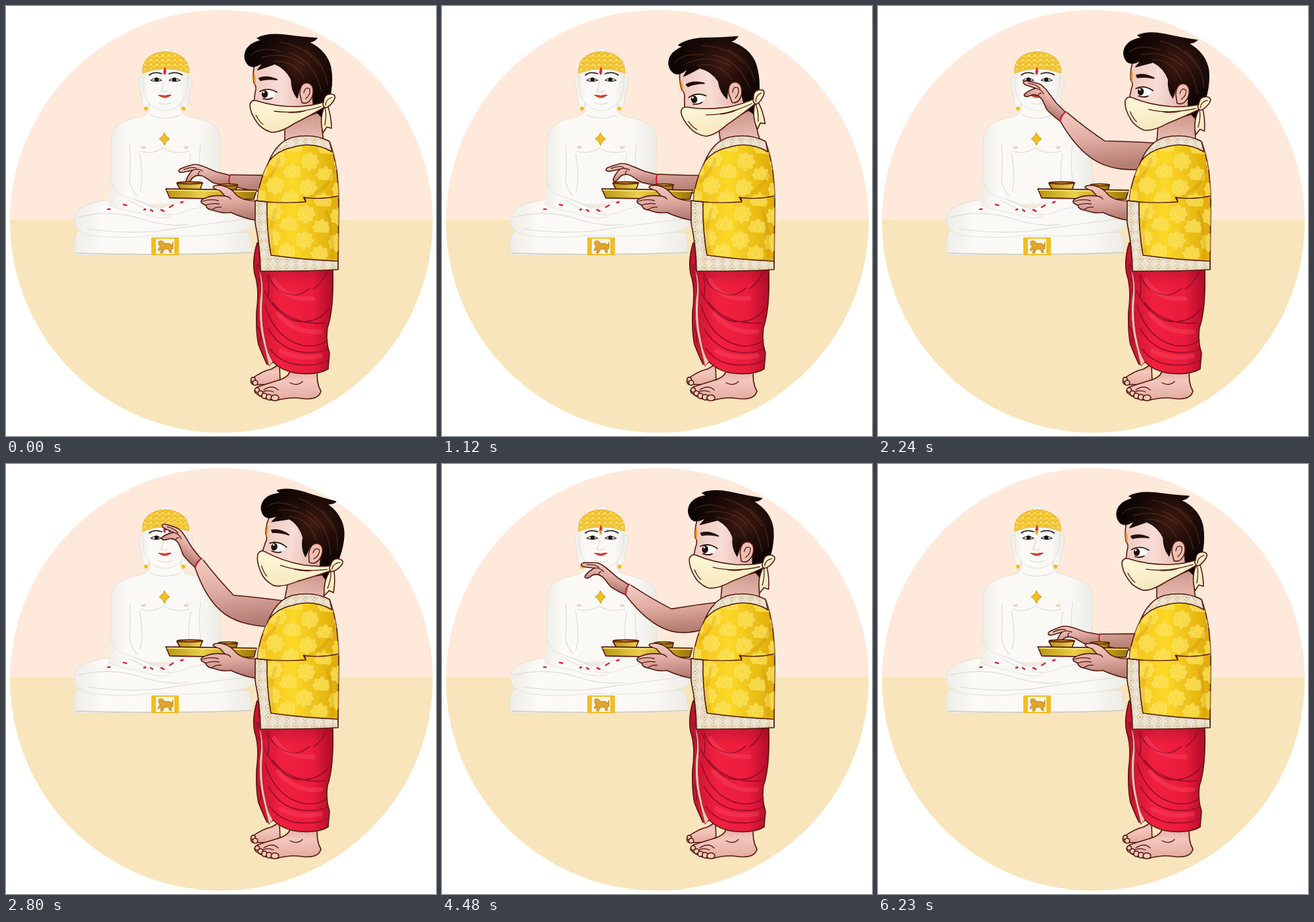
Recreate the animation shown at these times as an HTML page. Size 654 px wide and 654 px high, loop 6300 ms.

```html
<!DOCTYPE html>
<html lang="en">
<head>
<meta charset="utf-8">
<title>Offering</title>
<style>
html, body { margin: 0; height: 100%; overflow: hidden; background: #fff; }
svg { display: block; width: 100vw; height: 100vh; }
path, ellipse, circle { stroke-linejoin: round; stroke-linecap: round; }
.ink { stroke: #54180f; stroke-width: 1.6; }
.line { fill: none; stroke: #54180f; stroke-width: 1.3; }
.stone { fill: url(#stone); stroke: #e4e1d9; stroke-width: 1; }
.fold { fill: none; stroke: #dedbd3; stroke-width: 1.2; }
.crease { fill: none; stroke: #8f0c27; stroke-width: 1.5; }
.nail { fill: none; stroke: #d72b43; stroke-width: 2.6; }
</style>
</head>
<body>
<svg viewBox="0 0 654 654">
<defs>
  <clipPath id="disc"><circle cx="327.5" cy="327.5" r="321.5"/></clipPath>
  <linearGradient id="stone"><stop stop-color="#efede8"/><stop offset=".16" stop-color="#fbfaf7"/><stop offset=".8" stop-color="#f9f8f5"/><stop offset="1" stop-color="#ecebe5"/></linearGradient>
  <linearGradient id="skin" x2=".15" y2="1"><stop stop-color="#f3cdc3"/><stop offset=".5" stop-color="#e0aca2"/><stop offset="1" stop-color="#b47d74"/></linearGradient>
  <linearGradient id="foot" x2=".1" y2="1"><stop stop-color="#e0a298"/><stop offset=".45" stop-color="#f3c6bc"/><stop offset="1" stop-color="#e5aca1"/></linearGradient>
  <linearGradient id="face"><stop stop-color="#efc9c0"/><stop offset=".4" stop-color="#f8dcd5"/><stop offset="1" stop-color="#d9a195"/></linearGradient>
  <linearGradient id="neck" y2="1" x2="0"><stop stop-color="#c48a7f"/><stop offset="1" stop-color="#eec4b9"/></linearGradient>
  <radialGradient id="hair" cx=".62" cy=".35" r=".55"><stop stop-color="#3f1b12"/><stop offset=".5" stop-color="#200c08"/><stop offset="1" stop-color="#0b0403"/></radialGradient>
  <linearGradient id="cloth"><stop stop-color="#f2c21c"/><stop offset=".45" stop-color="#fbd827"/><stop offset="1" stop-color="#dfaa08"/></linearGradient>
  <linearGradient id="red"><stop stop-color="#c5102f"/><stop offset=".35" stop-color="#f1203f"/><stop offset=".75" stop-color="#ea1b3c"/><stop offset="1" stop-color="#b00d2a"/></linearGradient>
  <linearGradient id="shade" x2="0" y2="1"><stop stop-color="#8f0c27" stop-opacity=".5"/><stop offset=".5" stop-color="#8f0c27" stop-opacity="0"/></linearGradient>
  <linearGradient id="gold"><stop stop-color="#b8920f"/><stop offset=".4" stop-color="#ead04a"/><stop offset=".7" stop-color="#cda51b"/><stop offset="1" stop-color="#997508"/></linearGradient>
  <linearGradient id="mask" x2=".3" y2="1"><stop stop-color="#fff8dc"/><stop offset="1" stop-color="#f6e8bd"/></linearGradient>
  <pattern id="motif" width="50" height="40" patternUnits="userSpaceOnUse" patternTransform="translate(450 222) rotate(4)">
    <g id="flower" fill="#fbe04e" stroke="#fbea95" stroke-width="1.1">
      <path d="M13-1l4 5 6 0 0 6 4 3-4 4 0 6-6 0-4 5-4-5-6 0 0-6-4-4 4-3 0-6 6 0z"/>
      <path d="M13 5l6 8-6 8-6-8z"/>
    </g>
    <use href="#flower" x="25" y="20"/>
  </pattern>
  <pattern id="lace" width="14" height="14" patternUnits="userSpaceOnUse">
    <path fill="#ece3d2" d="M0 0h14v14H0z"/>
    <path d="M7 1l5 6-5 6-5-6z" fill="none" stroke="#d0b98a" stroke-width="1"/><circle cx="7" cy="7" r="1.6" fill="#d9b35f"/>
  </pattern>
  <pattern id="beads" width="9" height="7" patternUnits="userSpaceOnUse">
    <path fill="#f6cc3c" d="M0 0h9v7H0z"/><path d="M0 5q4.500-7 9 0" fill="none" stroke="#e3a925" stroke-width="1"/><circle cx="4.500" cy="5" r="1.200" fill="#ffe78c"/>
  </pattern>
</defs>

<g clip-path="url(#disc)"><path fill="#ffe9db" d="M0 0h654v325H0z"/><path fill="#f8e5bb" d="M0 325h654v329H0z"/></g>

<g id="statue">
  <path class="stone" d="M109 343Q103 347 104 374Q105 379 114 379L368 377Q375 376 374 367L371 345Z"/>
  <path d="M107 376Q240 380 373 375" fill="none" stroke="#cfcabe" stroke-width="1.6"/>
  <path class="stone" d="M219 148Q220 164 207 168Q169 175 162 192C157 222 162 244 158 267Q160 284 174 292L185 302H304L320 287Q329 274 326 254C323 230 330 204 323 189Q315 175 278 168Q263 164 265 147Z"/>
  <path class="fold" d="M188 212Q190 240 188 263Q188 276 199 289M296 211Q292 239 296 263Q298 278 288 288M203 224Q210 259 204 282M281 225Q275 254 280 280M205 221Q224 226 239 216Q255 226 279 221M220 166Q241 175 265 166"/>
  <path class="stone" d="M175 292C145 297 113 300 105 317Q98 342 130 349Q175 355 222 349Q315 353 365 341Q384 333 379 319Q370 303 329 299L300 290Q267 307 239 306Q207 306 175 292Z"/>
  <path class="stone" d="M161 269Q163 285 184 290Q212 300 238 310Q252 316 250 321Q232 326 202 314Q166 309 156 302M325 270Q322 286 302 291Q268 294 248 303Q230 309 232 315Q250 323 281 309Q303 306 319 298"/>
  <path class="fold" d="M109 321Q161 309 206 324Q245 337 278 332M124 339Q201 350 266 337Q327 329 372 323M187 296l30 15M196 294l32 14"/>
  <path class="nail" d="M155 309l3 0M179 302l4 1M210 310l2-1M236 310l4 2M249 306l5-3M266 299l3-1M220 310l3 2"/>
  <path class="stone" d="M209 108Q199 104 202 120Q206 130 207 149Q211 160 217 154L215 125ZM275 108Q286 104 283 121Q278 131 277 149Q272 160 267 154L270 125Z"/>
  <path class="stone" d="M208 99Q206 136 217 147Q229 159 242 159Q257 159 268 146Q279 133 277 98Q242 77 208 99Z"/>
  <ellipse class="stone" cx="243" cy="70" rx="8" ry="5.5"/>
  <path d="M208 102Q205 73 242 69Q280 73 278 102Q243 89 208 102Z" fill="url(#beads)" stroke="#e5b53a"/>
  <path d="M208 101Q243 88 278 101" fill="none" stroke="#f0c445" stroke-width="2.4"/>
  <path d="M218 105Q226 99 237 103M248 103Q259 99 268 105" fill="none" stroke="#292322" stroke-width="1.7"/>
  <path d="M220 113Q228 107 237 113Q228 116 220 113ZM248 113Q256 107 265 113Q257 116 248 113Z" fill="#fff" stroke="#302723" stroke-width="1.1"/>
  <circle cx="229" cy="112" r="3.2" fill="#15100f"/><circle cx="256" cy="112" r="3.2" fill="#15100f"/>
  <path d="M239 114Q240 125 235 129Q241 133 247 128M232 147Q242 152 252 147" fill="none" stroke="#e3d6cd" stroke-width="1.1"/>
  <path d="M231 135Q237 135 242 136Q247 134 252 135Q242 145 231 135Z" fill="#e5503f"/><path d="M232 136Q242 139 251 136" fill="none" stroke="#a22d22" stroke-width=".8"/>
  <path d="M242 92Q246 101 241 105Q237 101 242 92Z" fill="#dc283b"/>
  <ellipse id="paste" cx="241.5" cy="104" rx="1.8" ry="3.6" fill="#f3a11d"/>
  <g fill="#f4bd1b"><circle cx="213" cy="156" r="3"/><circle cx="270" cy="156" r="3"/></g>
  <path d="M241 193l3 5 5 4-5 4-3 6-3-6-5-4 5-4z" fill="#f0be20" stroke="#d69f1c"/>
  <g fill="#ecd4cb"><ellipse cx="209" cy="215" rx="4" ry="2"/><ellipse cx="274" cy="215" rx="4" ry="2"/></g>
  <path fill="#f2bd25" d="M221 352h42v27h-42z"/><path fill="#fdf6e0" d="M228 354h28v23h-28z"/>
  <path d="M232 362q-1-5 3-5 4 0 6 4h7q4 1 4 4l2-6v10l-3 1 1 5h-3l-2-5h-6l-3 6h-3l1-7-3 3h-2l3-6z" fill="#e0a52c" stroke="#8f6820" stroke-width=".6"/>
</g>

<path id="arm" class="ink" fill="url(#skin)"/>
<g id="hand">
  <path class="ink" fill="url(#skin)" d="M0-7L-20-12C-38-19-50-26-59-23Q-67-21-77-17C-81-13-78-11-72-12L-58-15Q-65-8-68 1C-68 5-64 4-61 1Q-56-8-47-7C-37-6-33 2-24 5Q-12 8 0 9"/>
  <path class="line" d="M-58-15Q-50-18-43-14M-71-16Q-59-21-52-18M-48-7Q-51-10-47-13"/>
  <path d="M0-8Q-5 1 0 9" fill="none" stroke="#d51e39" stroke-width="2.2"/>
</g>

<g class="turn"><path class="ink" fill="url(#neck)" d="M424 176V212H484Q480 191 480 150Z"/></g>

<g id="feet">
  <path class="ink" fill="url(#foot)" d="M416 545L404 552Q388 556 374 567Q370 573 376 576L417 575Z"/>
  <path class="ink" fill="url(#foot)" d="M432 552Q433 564 412 570L383 579Q375 584 380 589Q393 600 411 600Q433 594 450 597Q475 600 479 586Q471 572 474 552Z"/>
  <path class="line" d="M386 590Q396 582 407 587M392 584Q405 575 414 584M432 573Q443 579 451 571"/>
  <g class="ink" fill="#f2c9ba" stroke-width="1"><circle cx="376" cy="568" r="3.4"/><circle cx="379" cy="573" r="3.8"/><circle cx="382" cy="584" r="3.5"/><circle cx="387" cy="589" r="3.8"/><circle cx="393" cy="593" r="4"/><circle cx="400" cy="595" r="4.2"/><ellipse cx="409" cy="596" rx="6" ry="4.5"/></g>
</g>

<g id="dhoti">
  <path id="drape" class="ink" fill="url(#red)" d="M382 360Q374 386 378 407Q386 430 381 465Q380 496 384 515Q392 535 397 545L407 542Q422 557 447 559Q476 561 490 552L492 528Q486 511 489 489Q499 460 497 400Z"/>
  <path fill="url(#shade)" d="M380 392H497V460H382Z"/>
  <path class="crease" d="M398 407Q407 437 441 440Q452 438 462 429M393 433Q413 474 444 480Q477 482 491 460M394 455Q409 506 451 516Q475 520 489 508M399 491Q420 527 459 527Q480 528 490 520M405 450Q431 486 485 482M401 521Q420 546 453 546Q478 547 491 538M397 412Q402 424 398 444M383 414Q389 419 387 433M383 488Q389 494 387 511M488 404Q481 421 468 430"/>
  <path d="M408 417Q424 448 467 445M414 468Q442 500 479 495M418 525Q447 539 479 532" fill="none" stroke="#ff5870" stroke-width="7" opacity=".3"/>
  <path d="M386 402Q393 420 390 450Q388 482 395 511Q398 529 406 541L400 548Q393 520 389 502Q384 479 386 447Q390 427 385 402Z" fill="#f1c4b4" stroke="#a72831"/>
</g>

<g id="shawl">
  <path class="ink" fill="url(#cloth)" d="M430 204Q463 194 492 206Q499 224 503 250Q507 281 506 310L505 400L388 402Q383 371 382 298Q384 267 400 236Q412 211 430 204Z"/>
  <path fill="url(#motif)" d="M430 204Q463 194 492 206Q499 224 503 250Q507 281 506 310L505 400L388 402Q383 371 382 298Q384 267 400 236Q412 211 430 204Z" opacity=".75"/>
  <path class="ink" fill="url(#lace)" d="M400 236Q412 207 435 200Q468 193 492 206L496 222Q468 205 436 215Q414 219 400 236Z"/>
  <path d="M499 245Q494 277 457 292M393 267Q412 250 415 233M488 313Q498 343 496 381M410 310Q398 344 407 374" fill="none" stroke="#b77d06" stroke-width="5" opacity=".2"/>
</g>

<g id="offering">
  <path class="ink" fill="url(#gold)" d="M260 270L265 279H295L299 269ZM323 272L327 280H350L352 272Z"/>
  <ellipse class="ink" cx="279.5" cy="269" rx="19.5" ry="1.6" fill="#f0a63c"/><ellipse class="ink" cx="337.5" cy="272" rx="14.5" ry="1.5" fill="#e8c24b"/>
  <path class="ink" fill="url(#gold)" d="M243 278L381 280L377 294L249 292Z"/><path d="M245 280L380 282" stroke="#fae987" stroke-width="1.5"/>
  <path class="ink" fill="url(#skin)" d="M384 297Q360 296 351 288Q342 276 328 273Q315 272 315 276Q318 279 326 281L333 289Q315 287 306 291Q293 295 298 300L304 303Q304 309 316 311Q330 316 342 314Q361 323 385 327Z"/>
  <path class="line" d="M299 297Q311 293 323 296M303 303Q314 299 324 301M313 310Q319 305 327 306M333 289Q340 290 342 294"/>
</g>

<path class="ink" fill="url(#lace)" d="M379 296L397 298Q396 338 403 379Q454 386 505 388L505 401Q440 404 387 403Q387 369 379 330Z"/>
<path class="line" d="M379 296Q417 301 456 298Q456 293 452 291Q478 295 505 289M456 298L452 291"/>

<g class="turn" id="head">
  <path class="ink" fill="url(#face)" d="M380 82Q374 100 377 117Q382 123 379 131L376 154L424 180L480 160L482 104L438 75Z"/>
  <path d="M377 101Q375 112 379 121Q381 109 377 101Z" fill="#f19a16"/>
  <path d="M385 110Q397 105 412 112Q398 110 387 113Z" fill="#21100c" stroke="#21100c" stroke-width="2"/>
  <path d="M388 130Q398 125 410 131Q410 138 402 140Q392 141 388 137Z" fill="#fff"/>
  <ellipse cx="393.500" cy="134" rx="4.800" ry="5.800" fill="#21100c"/><circle cx="392" cy="131" r="1.500" fill="#fff"/>
  <path d="M386 130Q398 123 412 131M391 141Q399 143 405 140" fill="none" stroke="#21100c" stroke-width="1.700"/>
  <path d="M363 76Q364 58 389 52Q383 50 382 49Q397 41 423 44Q453 48 473 49Q469 54 460 55Q488 68 494 94Q500 128 482 171L468 157L465 123Q451 112 446 127L443 140Q434 129 434 112Q426 95 409 88Q395 93 383 97Q388 91 390 86Q377 96 369 90Q363 84 363 76Z" fill="url(#hair)" stroke="#160706" stroke-width="1.4"/>
  <path d="M372 75Q386 61 418 69M390 78Q425 68 455 91M407 84Q439 82 454 112M417 55Q456 61 476 91M431 71Q469 84 480 130M455 67Q485 85 489 121" fill="none" stroke="#70412c" stroke-width="1.5" opacity=".45"/>
  <path class="ink" fill="#ecbfb2" d="M447 134Q447 116 459 117Q470 120 466 137Q460 151 450 147Z"/><path class="line" d="M453 132Q455 122 462 126Q464 134 456 141"/>
  <path class="ink" fill="url(#mask)" d="M371 150Q373 142 381 144Q408 153 442 153Q467 152 484 146L486 153Q464 166 438 179Q417 193 403 192Q388 187 381 176Q371 162 371 150Z"/>
  <path class="line" d="M408 160Q441 165 479 153M380 166Q386 177 391 180M430 162Q444 163 456 159"/>
  <path class="ink" fill="url(#mask)" d="M485 152Q476 170 482 193L488 184L495 186Q495 168 489 151Z"/>
  <path class="ink" fill="url(#mask)" d="M483 146Q484 133 495 134Q503 135 499 143Q493 153 486 155Q480 152 483 146Z"/><path class="line" d="M486 151Q486 142 496 139M485 155Q488 165 485 181"/>
</g>
</svg>
<script>
// time, upper arm, forearm and hand angles, head tilt
const poses = [
  [0, 77.7, 7, 11.6, 0], [1120, 89, 9, 12, -8.3], [1820, 143, 31, 21, -0.2],
  [2240, 164, 46, 42.4, 4.6], [2800, 170, 58, 47.6, 10.7], [3920, 169.5, 54, 45.5, 7.2],
  [4760, 140, 32, 22, 3.9], [5110, 119.6, 25, 23, 2.6], [6300, 77.7, 5, 6.5, -0.2]
];
const loop = 6300, step = 70, shoulder = [430, 226];
const byId = id => document.getElementById(id);
const arm = byId("arm"), hand = byId("hand"), paste = byId("paste");
const turning = document.querySelectorAll(".turn");
const polar = (deg, r) => [r * Math.cos(deg * Math.PI / 180), r * Math.sin(deg * Math.PI / 180)];
const add = (p, q, k = 1) => [p[0] + q[0] * k, p[1] + q[1] * k];
const unit = p => { const d = Math.hypot(...p); return [p[0] / d, p[1] / d]; };

function poseAt(t) {
  const i = poses.findIndex(p => p[0] > t), from = poses[i - 1], to = poses[i];
  const k = (t - from[0]) / (to[0] - from[0]);
  return from.map((v, j) => v + (to[j] - v) * k);
}

function draw(now) {
  const t = Math.floor(now % loop / step) * step;
  const [, upper, fore, wristTurn, tilt] = poseAt(t);
  const elbow = add([405, 205], polar(upper, 71));
  const wrist = add(elbow, polar(fore, 79), -1);
  const a = unit(add(wrist, elbow, -1)), b = unit(add(shoulder, elbow, -1));
  const bend = unit(add(a, b)), normal = [-a[1], a[0]];
  const inner = add(elbow, bend, 21), outer = add(elbow, bend, -30);
  const top = add(wrist, normal, 8), bottom = add(wrist, normal, -8);
  arm.setAttribute("d", `M${top}Q${add(add(elbow, a, 40), normal, 12)} ${inner}Q${add(inner, b, 40)} 430,209
    L408,248C${add(outer, b, 28)} ${add(outer, a, 14)} ${bottom}`);
  hand.setAttribute("transform", `translate(${wrist}) rotate(${wristTurn - 11.6})`);
  turning.forEach(g => g.setAttribute("transform", `rotate(${tilt} 444 207)`));
  paste.style.display = t >= 3500 ? "" : "none";
  requestAnimationFrame(() => draw(performance.now()));
}
draw(0);
</script>
</body>
</html>
```
